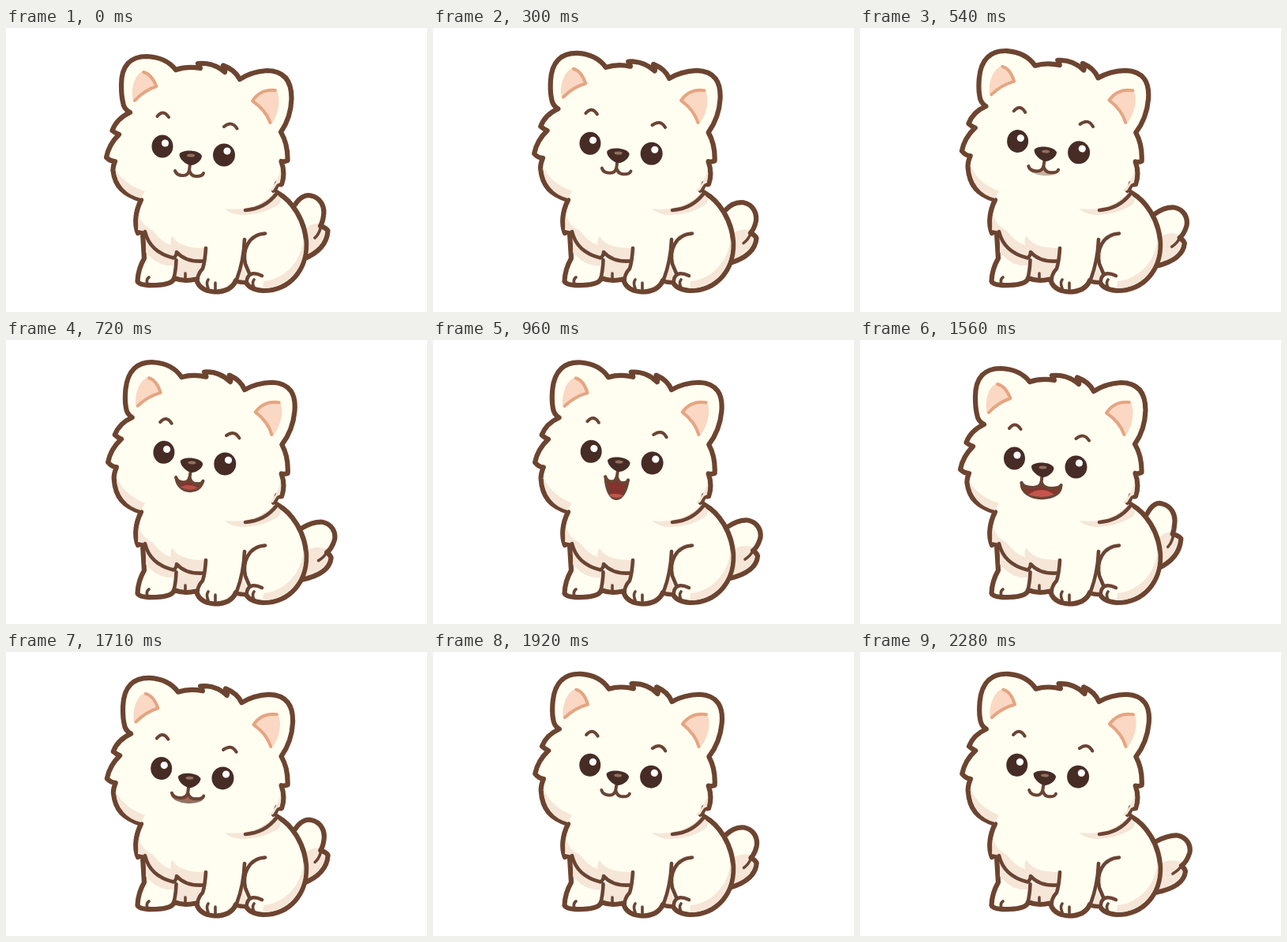
These frames come from a looping animation (533 by 360 pixels, 2310 ms). An HTML page:

```html
<!DOCTYPE html>
<html lang="en">
<head>
<meta charset="utf-8">
<title>Puppy</title>
<style>
  html, body { margin: 0; width: 100%; height: 100%; overflow: hidden; background: #fff; }
  svg { display: block; width: 100%; height: 100%; }
  path { fill: none; stroke-linecap: round; stroke-linejoin: round; }
  .fur { fill: #fffef1; }
  .shade { fill: #f6e6d8; }
  .out { stroke: #6c4430; stroke-width: 6.2; }
  .line { stroke: #6b4433; stroke-width: 4.6; }
  .thin { stroke: #6b4433; stroke-width: 3.6; }
  .inner { fill: #fad8c3; }
  .rim { stroke: #e5a582; stroke-width: 4; }
  .dark { fill: #472c25; }
</style>
</head>
<body>
<svg viewBox="0 0 533 360">
  <g id="tail">
    <path class="fur"/>
    <path class="shade"/>
    <path class="out"/>
    <path class="thin"/>
  </g>

  <path class="fur out warp" d="M157 107 Q149 103 148 94 Q146 86 146 72 C146 47 158 36 178 36 C194 36.500 207 43 215 53
    Q229 48 246 51 Q245 47 243 45 Q262 43 277 56 Q278 51 275 47.500 Q290 53 296 65
    Q310 55.500 330 54 C353 54 361.500 68 361.500 89 Q361 113 348 132 Q357 147 356.500 168 Q352 170 348.500 169
    Q354 184 349 198 Q346 199 343 197 Q342 203 339 206 L344 209
    C362 219 378 243 380 270 C382 306 360 333 325 333 Q307 331 304 322 Q298 323 291 320
    Q285 334.500 264 334.500 Q244 333 241 318 Q226 322 213 317 Q211 325 190 326 Q169 327 166.500 321
    Q167 306 175 292 L173 260 Q170 258 167 260 C162 248 164 232 171 218
    C149 211 138 201 135.500 181 Q135 176 138 169 Q132 169 127 164 Q130 148 143 135 Q138 133 134.500 130 Q140 115 157 107 Z"/>

  <path class="shade warp" d="M138.500 179 Q149 198 176 207 L171 216 Q142 209 138.500 179 Z"/>
  <path class="shade warp" d="M348 176 Q345 196 332 207 L338 206 L343 198 L347 196 Z"/>
  <path class="shade" d="M277 229 Q298 232 318 224 Q332 217 340 208 Q352 217 345 224 Q324 237 300 237 Q284 236 277 229 Z"/>
  <path class="shade" d="M168 235 Q172 251 186 257 Q197 272 209 275 Q207 268 211 264 Q219 279 251 279 L250 295 Q224 295 214 286 L210 290 Q186 282 177 258 L167 256 Z"/>
  <path class="shade" d="M177 266 Q186 282 213 291 L212 301 Q192 303 177 284 Z"/>
  <path class="shade" d="M216 293 L249 297 Q249 305 242 315 Q226 319 215 314 Z"/>
  <path class="shade" d="M301 302 L305 316 L303 320 L294 319 Z"/>
  <path class="shade" d="M377 266 Q373 300 346 315 Q337 320 326 321 L325 330 C354 331 382 306 377 266 Z"/>

  <path class="line" d="M303 231 Q328 229 342.500 210"/>
  <path class="line" d="M176 258 Q182 284 212 291.500 Q216 289 216 284 Q227 297 250 295.500"/>
  <path class="line" d="M253 279 Q252 296 249 305 Q241 313 243 324"/>
  <path class="line" d="M302 268 Q301 295 292 319"/>
  <path class="line" d="M328 260.500 C307 262 299 281 303 299 L308 311"/>
  <path class="line" d="M324 314 Q306 306 304.500 322"/>
  <path class="line" d="M215.500 294 Q215 308 212 319"/>
  <path class="thin" d="M181 316 Q177 319 179 324 M256 319 Q253 323 256 330 M265 323 L265 331 M314 319 Q311 323 314 329 M227 311 L227 317"/>

  <path class="inner warp" d="M161 93 C157 75 164 57 174 55 Q184 57 191 74 Q174 80 161 93 Z"/>
  <path class="rim warp" d="M174 56 Q184 58 190.500 74 Q175 79 163 92"/>
  <path class="inner warp" d="M311 93 Q321 78 342 79 C349 87 345 113 335 122 Q329 104 311 93 Z"/>
  <path class="rim warp" d="M341 79 Q322 77 312 92.500 Q329 104 334.500 120"/>

  <g id="face">
    <path class="thin" style="stroke-width:4" d="M191.500 112 Q199 102.500 206 113 M276 125 Q286 117 292.500 127.500"/>
    <ellipse class="dark" cx="198" cy="150" rx="13.500" ry="14.500"/>
    <ellipse class="dark" cx="276" cy="161" rx="14" ry="14.500"/>
    <circle cx="201.500" cy="146" r="4.600" fill="#fff"/>
    <circle cx="280" cy="156" r="4.600" fill="#fff"/>
    <g id="open">
      <path id="mouth" class="thin" style="fill:#85332f"/>
      <path id="tongue" style="fill:#c5544d"/>
    </g>
    <path id="lips" class="line" style="stroke-width:4"/>
    <path class="dark" d="M219.500 160 C222 154 244 153.500 248 162 C248 168 240 174 234 174 C228 173.500 219 166 219.500 160 Z"/>
    <ellipse cx="234" cy="161.500" rx="5" ry="2" fill="#92705f"/>
  </g>
</svg>
<script>
const LOOP = 2310, STEP = 30;
const $ = s => document.querySelector(s);
const clamp = v => Math.max(0, Math.min(1, v));
const mix = (a, b, k) => a + (b - a) * k;
const ease = k => (1 - Math.cos(Math.PI * k)) / 2;

// time, head lift, face x, face y, tail swing
const pose = [
  [0, 0, 0, 0, 0],
  [540, .85, 1, -5, .75],
  [750, .95, 1.2, -6, .92],
  [960, .92, 1.5, -7, .8],
  [1320, .45, -.5, -3.5, -.06],
  [1560, 0, -2.5, 0, -.25],
  [1920, 1, 0, -5, .5],
  [2280, 1, 0, -5, 1]
];
// time, half width, chin depth below the nose
const talk = [
  [0, 18, 24], [480, 18.5, 24], [540, 19, 26], [960, 14.5, 44],
  [1320, 20.5, 30], [1560, 25, 36], [1800, 18, 24], [2280, 17, 24]
];

function at(keys, t) {
  let i = 1;
  while (i < keys.length - 1 && keys[i][0] < t) i++;
  const a = keys[i - 1], b = keys[i];
  const k = ease(clamp((t - a[0]) / (b[0] - a[0])));
  return a.slice(1).map((v, n) => mix(v, b[n + 1], k));
}

const warped = [...document.querySelectorAll('.warp')].map(el => [el, el.getAttribute('d')]);

// Tilts the upper part of the drawing while the chest stays put.
function bend(d, lift) {
  return d.replace(/([\d.]+) ([\d.]+)/g, (_, xs, ys) => {
    const x = +xs, y = +ys;
    const up = Math.max(0, 190 - y) / 156;
    const dx = 10 * up * up + (x < 150 ? 2 * clamp((205 - y) / 40) * clamp((y - 90) / 40) : 0);
    const dy = (x - 335) * .052 * ease(clamp((215 - y) / 65));
    return (x + lift * dx).toFixed(2) + ' ' + (y + lift * dy).toFixed(2);
  });
}

const tailEdge = [
  'M366 224 C372 214 380 211 386 212.500 C398 215 404 226 402 238 Q401 246 398 251 Q405 253 407.500 257 Q406 281 376 293',
  'M375 240 C383 236 392 232 402 232.500 C414 235 419 245 417.500 254 Q414 266 407 271 Q411 274 412 278 Q410 298 374 305'
];
const tailShade = [
  'M374 262 Q382 246 399 248 L398 251 L404 257 Q402 277 378 290 Z',
  'M376 272 Q390 259 408 267 L406 271 L409 277 Q406 294 376 302 Z'
];
const tailNotch = ['M399 250 Q397 261 391 266', 'M407 271 Q403 277 396 281'];

function morph([a, b], k) {
  const end = b.match(/[\d.]+/g);
  let i = 0;
  return a.replace(/[\d.]+/g, v => mix(+v, +end[i++], k).toFixed(2));
}

const tail = $('#tail').children;

function drawTail(k) {
  const edge = morph(tailEdge, k);
  tail[0].setAttribute('d', edge);
  tail[1].setAttribute('d', morph(tailShade, k));
  tail[2].setAttribute('d', edge);
  tail[3].setAttribute('d', morph(tailNotch, k));
}

function drawMouth(w, depth) {
  const x = 232, y = 181, l = x - w, r = x + w;
  const low = 164 + depth, pull = (low - y / 4) / .75;
  const side = w * (.75 + (w - 14.5) * .03);
  const lips = `M${l} ${y} Q${l + 2} 187 ${x - w * .45} 187 Q${x - 1} 187 ${x} 180 ` +
    `Q${x + 2} 188 ${x + w * .48} 188 Q${r - 1} 188 ${r} ${y + 3}`;
  $('#lips').setAttribute('d', lips + ` M233 172 L${x} 181`);
  $('#mouth').setAttribute('d', lips + ` C${x + side} ${pull} ${x - side} ${pull} ${l} ${y} Z`);
  const tw = w * .66, h = w * .4;
  $('#tongue').setAttribute('d', `M${x - tw} ${low - 4} Q${x} ${low - 2 * h + 4} ${x + tw} ${low - 4} Q${x} ${low + 2} ${x - tw} ${low - 4} Z`);
  $('#tongue').style.opacity = clamp((depth - 28) / 6);
  $('#open').style.opacity = clamp((depth - 24) / 5);
}

function draw(t) {
  const [lift, fx, fy, swing] = at(pose, t);
  for (const [el, d] of warped) el.setAttribute('d', bend(d, lift));
  $('#face').setAttribute('transform', `translate(${fx} ${fy}) rotate(${lift * 2.9} 234 164)`);
  drawTail(swing);
  drawMouth(...at(talk, t));
}

function tick() {
  const t = performance.now() % LOOP;
  draw(Math.floor(t / STEP) * STEP);
  requestAnimationFrame(tick);
}
tick();
</script>
</body>
</html>
```
